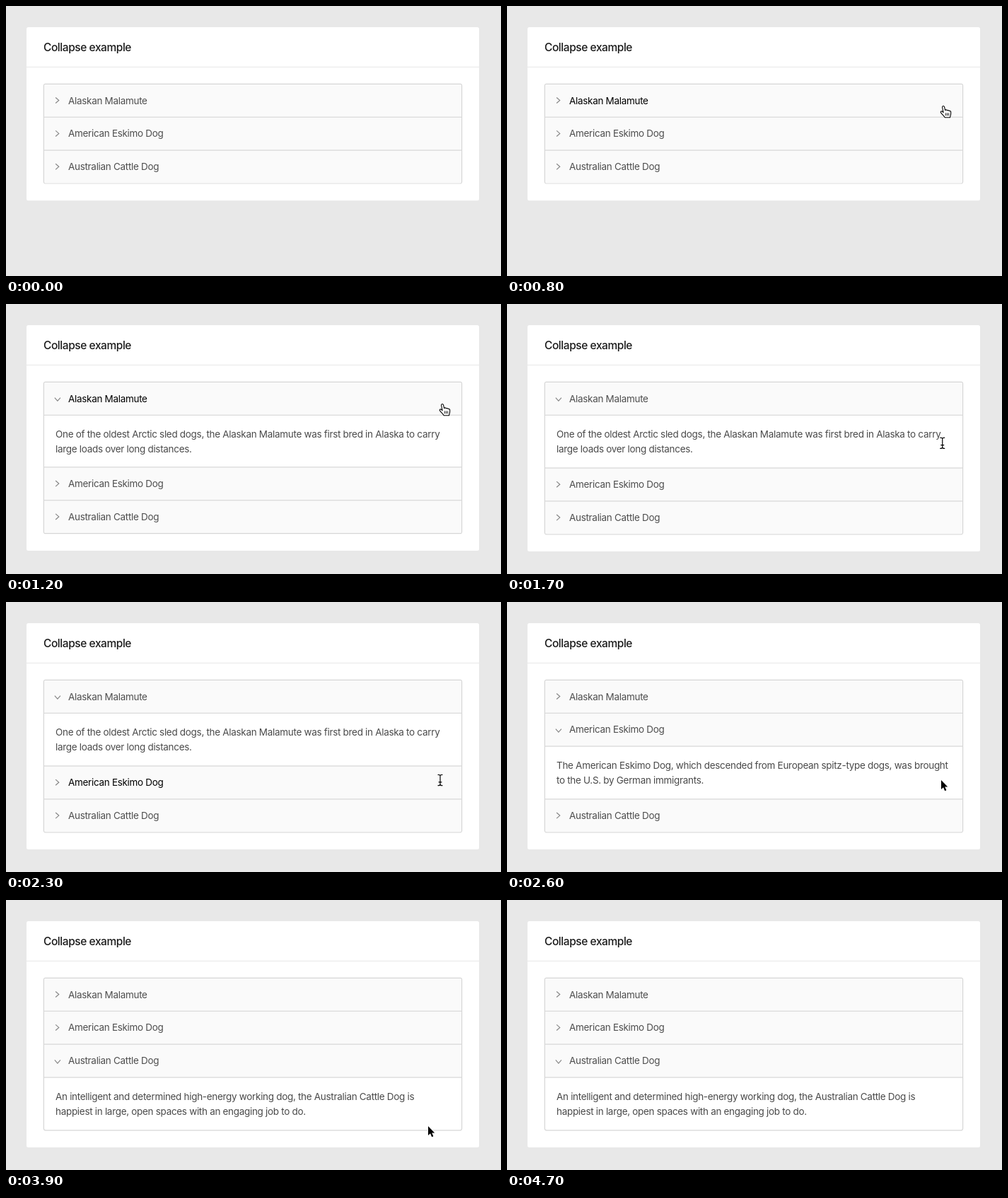
Animation, 700 px wide and 382 px high, one loop 5100 ms. Source, as an HTML page:

```html
<!DOCTYPE html>
<html lang="en">
<head>
<meta charset="utf-8">
<title>Collapse example</title>
<style>
html, body { margin: 0; width: 100%; height: 100%; overflow: hidden; background: #e8e8e8; }
svg { display: block; }
text { font: 13.5px Inter, "Liberation Sans", sans-serif; letter-spacing: -.31px; fill: #4a4a4a; white-space: pre; }
#heading { font-size: 15.5px; font-weight: 500; letter-spacing: -.44px; fill: #1a1a1a; }
.chevron { fill: none; stroke: #858585; stroke-width: 1.15; }
.line { fill: #d6d6d6; }
</style>
</head>
<body>
<svg id="stage" width="700" height="382" viewBox="0 0 700 382">
  <rect width="700" height="382" fill="#e8e8e8"/>
  <rect id="card" x="29" y="30" width="640" rx="2.5" fill="#fff"/>
  <rect x="29" y="85.8" width="640" height="1" fill="#e6e6e6"/>
  <text id="heading" x="53" y="64">Collapse example</text>
  <svg id="frameClip" x="0" y="0" width="700">
    <rect id="frame" x="53.4" y="110.3" width="591.2" rx="2.5" fill="#fff" stroke="#d6d6d6" stroke-width="1.2"/>
  </svg>
  <g id="items"></g>
  <g id="cursor">
    <g id="arrow">
      <path d="M0 0V13L3 10.3L5.2 15.2L7.4 14.2L5.2 9.5H9.2Z" fill="#000" stroke="#fff" stroke-width="1.6" paint-order="stroke" stroke-linejoin="round"/>
    </g>
    <g id="hand" fill="#fff" stroke="#000" stroke-width="1.1" stroke-linejoin="round" stroke-linecap="round">
      <path d="M-.4 9.2L-1.9 2C-2.3 -.2 .4 -.8 1 1.2L2.2 6C3 5 4.8 5.2 5 6.3C6 5.6 7.3 6 7.6 7C8.8 6.4 10 7.2 10.2 8.4C10.6 11 10.2 13 9 16.2H1.8C.6 14 -2.4 11.6 -4 9.4C-5 7.8 -3.4 6.8 -2 7.8Z"/>
      <path d="M2.8 10.3V13.3M5 10.3V13.3M7.2 10.3V13.3" stroke-width=".9"/>
    </g>
    <g id="beam" fill="none" stroke-linecap="round">
      <path d="M-3 -7.7Q0 -7.7 0 -6V6Q0 7.7 -3 7.7M3 -7.7Q0 -7.7 0 -6M0 6Q0 7.7 3 7.7M-2 2.8H2" stroke="#fff" stroke-width="2.6"/>
      <path d="M-3 -7.7Q0 -7.7 0 -6V6Q0 7.7 -3 7.7M3 -7.7Q0 -7.7 0 -6M0 6Q0 7.7 3 7.7M-2 2.8H2" stroke="#000" stroke-width="1.2"/>
    </g>
  </g>
</svg>
<script>
const LOOP = 5100, STEP = 100;
const TOP = 110.3, HEAD = 46.9, PANEL = 74.8;

const dogs = [
  { name: "Alaskan Malamute", hover: [400, 1600], lines: [
    "One of the oldest Arctic sled dogs, the Alaskan Malamute was first bred in Alaska to carry",
    "large loads over long distances."] },
  { name: "American Eskimo Dog", hover: [1800, 2400], lines: [
    "The American Eskimo Dog, which descended from European spitz-type dogs, was brought",
    "to the U.S. by German immigrants."] },
  { name: "Australian Cattle Dog", hover: [3200, 3600], lines: [
    "An intelligent and determined high-energy working dog, the Australian Cattle Dog is",
    "happiest in large, open spaces with an engaging job to do."] }
];

// Each change closes one panel and opens another; 3 means none.
const changes = [
  { start: 900, dur: 400, from: 3, to: 0 },
  { start: 2300, dur: 300, from: 0, to: 1 },
  { start: 3500, dur: 400, from: 1, to: 2 }
];

const moves = [
  { start: 100, end: 700, from: [708, 147], to: [617.5, 141.5] },
  { start: 1400, end: 2000, from: [617.5, 141.5], to: [614, 252] },
  { start: 2800, end: 3400, from: [614, 252], to: [597, 320] },
  { start: 4200, end: 4700, from: [597, 320], to: [622, 366] }
];

const $ = id => document.getElementById(id);
const clamp = v => Math.max(0, Math.min(1, v));
const easeOut = u => 1 - (1 - u) ** 3;
const smooth = u => u * u * (3 - 2 * u);
const mix = (a, b, u) => a + (b - a) * u;

function set(el, attrs) {
  for (const key in attrs) el.setAttribute(key, attrs[key]);
}

function add(parent, tag, attrs, text) {
  const el = document.createElementNS("http://www.w3.org/2000/svg", tag);
  set(el, attrs);
  if (text) el.textContent = text;
  return parent.appendChild(el);
}

const items = dogs.map(dog => {
  const group = add($("items"), "g", {});
  const panel = add(group, "svg", { x: 54, y: HEAD, width: 590 });
  const body = add(panel, "g", {});
  dog.lines.forEach((line, i) => add(body, "text", { x: 16, y: 32.3 + 21 * i }, line));
  const head = add(group, "rect", { rx: 1.5, fill: "#fafafa" });
  const line = y => add(group, "rect", { class: "line", x: 53.4, y: y - .6, width: 591.2, height: 1.2 });
  const upper = line(0), lower = line(HEAD);
  const chevron = add(group, "path", { class: "chevron", d: "M-1.8 -5L2.8 -.95L-1.8 3.1" });
  const title = add(group, "text", { x: 88, y: 28.3 }, dog.name);
  return { group, panel, body, head, upper, lower, chevron, title };
});

function panelState(t) {
  const open = [0, 0, 0], turn = [0, 0, 0], shift = [0, 0, 0], moving = [false, false, false];
  for (const { start, dur, from, to } of changes) {
    if (t <= start) break;
    const p = easeOut(clamp((t - start) / dur));
    const q = clamp((t - start - 100) / 200);
    open[to] = p;
    turn[to] = q;
    shift[to] = -PANEL * (1 - p) / 2;
    if (from < 3) {
      open[from] = 1 - p;
      turn[from] = 1 - q;
    }
    for (let i = 0; i < 3; i++)
      moving[i] = p < .8 && i > Math.min(from, to) && i <= Math.max(from, to);
  }
  return { open, turn, shift, moving };
}

function drawItems(t) {
  const { open, turn, shift, moving } = panelState(t);
  let y = TOP;
  items.forEach((item, i) => {
    const h = PANEL * open[i], free = moving[i];
    const [on, off] = dogs[i].hover;
    const dark = clamp((t - on) / 200) - clamp((t - off) / 100);
    const grey = Math.round(mix(78, 0, dark));
    set(item.group, { transform: `translate(0 ${y})` });
    set(item.panel, { height: h, visibility: h > .3 ? "visible" : "hidden" });
    set(item.body, { transform: `translate(0 ${shift[i]})` });
    set(item.head, free
      ? { x: 52.8, y: 0, width: 592.4, height: HEAD }
      : { x: 54, y: .6, width: 590, height: HEAD - 1.2 });
    set(item.upper, { visibility: i && !free ? "visible" : "hidden" });
    set(item.lower, { visibility: h > .3 && !free ? "visible" : "hidden" });
    set(item.chevron, { transform: `translate(71.95 24.15) rotate(${90 * turn[i]})` });
    item.title.style.fill = `rgb(${grey},${grey},${grey})`;
    y += HEAD + h;
  });
  const loose = moving[2];
  set($("card"), { height: y + 24.3 - 30 });
  set($("frameClip"), { height: loose ? y - 1 : y + 2 });
  set($("frame"), { height: y - TOP + (loose ? 10 : 0) });
}

function drawCursor(t) {
  let pos = moves[0].from;
  for (const { start, end, from, to } of moves) {
    if (t < start) break;
    const u = smooth(clamp((t - start) / (end - start)));
    pos = [mix(from[0], to[0], u), mix(from[1], to[1], u)];
  }
  const kind = t < 800 ? "arrow" : t < 1700 ? "hand" : t < 2500 ? "beam" : "arrow";
  for (const id of ["arrow", "hand", "beam"]) $(id).style.display = id === kind ? "" : "none";
  $("cursor").style.display = t >= 200 && t < 4700 ? "" : "none";
  set($("cursor"), { transform: `translate(${pos[0]} ${pos[1]})` });
}

function draw(ms) {
  const t = Math.floor(ms % LOOP / STEP) * STEP;
  drawItems(t);
  drawCursor(t);
}

const begin = performance.now();
function tick() {
  draw(performance.now() - begin);
  requestAnimationFrame(tick);
}
tick();
</script>
</body>
</html>
```
